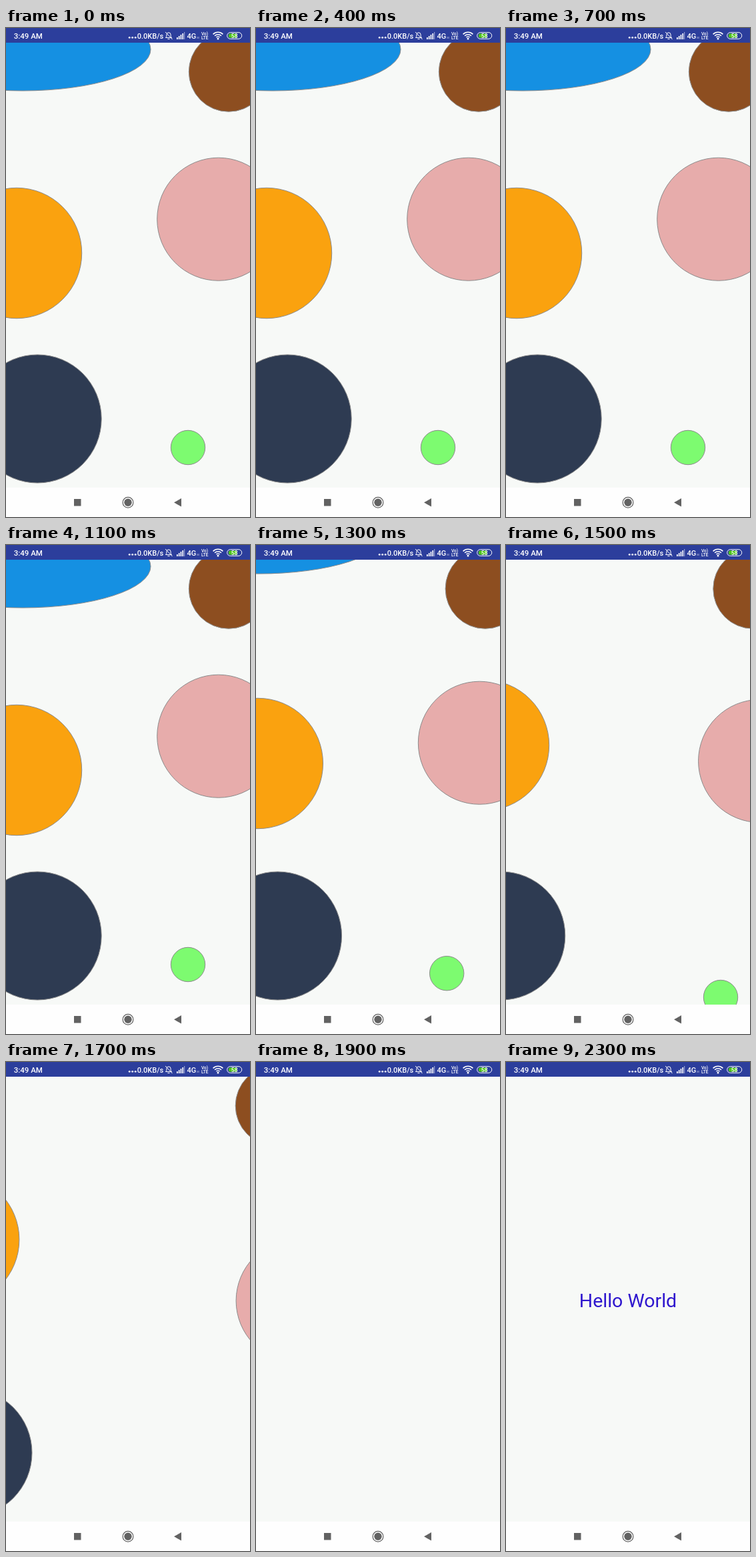
These frames come from a looping animation (366 by 732 pixels, 3.3 s). An HTML page:

```html
<!DOCTYPE html>
<html lang="en">
<head>
<meta charset="utf-8">
<title>Hello World</title>
<style>
html, body { margin: 0; width: 100%; height: 100%; overflow: hidden; background: #f7f9f7; }
svg { display: block; width: 366px; height: 732px; font-family: Roboto, sans-serif; }
#shapes { stroke: #8b8b8b; stroke-width: 1; }
.icon { fill: none; stroke: #fff; }
.bar { fill: #fff; font-weight: 500; }
</style>
</head>
<body>
<svg viewBox="0 0 366 732">
  <rect width="366" height="732" fill="#f7f9f7"/>
  <g id="shapes"></g>
  <text id="hello" x="183" y="366.5" font-size="28.5" text-anchor="middle" fill="#2f17ce">Hello World</text>

  <!-- status bar -->
  <rect width="366" height="22" fill="#2c3e9c"/>
  <g class="bar" font-size="11">
    <text x="11.7" y="15.5" font-size="11.5">3:49 AM</text>
    <circle cx="185.2" cy="14.3" r="1.4"/>
    <circle cx="189.7" cy="14.3" r="1.4"/>
    <circle cx="194.2" cy="14.3" r="1.4"/>
    <text x="196.7" y="15.5">0.0KB/s</text>
    <text x="271.5" y="15.5">4G</text>
    <text x="293" y="10.5" font-size="6.5">Vo)</text>
    <text x="293" y="17" font-size="6.5">LTE</text>
    <path d="M256 14h1.7v3h-1.7zM258.8 12h1.7v5h-1.7zM261.6 10h1.7v7h-1.7zM264.4 8h1.7v9h-1.7z"/>
    <path d="M267 6h1.2v11h-1.2zM286.5 13h1v3h-1zM288.5 13h1v3h-1z" opacity=".5"/>
    <circle cx="318" cy="16" r="1.5"/>
  </g>
  <g class="icon">
    <path d="M239.5 14.5h9l-1.4-2V10a3.1 3.1 0 0 0-6.2 0v2.5zM242.5 16.5h3M239 6l10.5 11"/>
    <path d="M310.6 9.4a10.5 10.5 0 0 1 14.8 0M313 11.8a7 7 0 0 1 10 0M315.4 14a3.7 3.7 0 0 1 5.2 0" stroke-width="1.5"/>
    <rect x="331.7" y="6.7" width="22" height="9.6" rx="4.8"/>
  </g>
  <path d="M337 8.3h9.5v6.4H337a3.2 3.2 0 0 1 0-6.4z" fill="#4fc51c"/>
  <text class="bar" x="342.7" y="14.6" font-size="8.5" text-anchor="middle">58</text>

  <!-- navigation bar -->
  <rect y="688" width="366" height="44" fill="#fefefe"/>
  <g fill="#626262">
    <rect x="102" y="705" width="10.5" height="10.5"/>
    <circle cx="183" cy="710.3" r="5.7"/>
    <circle cx="183" cy="710.3" r="7.9" fill="none" stroke="#626262" stroke-width="1.2"/>
    <path d="M252 710.3l11-6.3v12.6z"/>
  </g>
</svg>
<script>
// colour, centre x, centre y, radius x, radius y, travel x, travel y
const shapes = [
  ['#1590e2', 25, 32, 192, 62, -230, -560],
  ['#8d4e20', 334, 65.5, 59.7, 59.7, 108, 0],
  ['#e7acab', 318.7, 286.2, 92, 92, 183, 110],
  ['#faa20f', 16, 337, 97.7, 97.7, -145, -110],
  ['#2e3b52', 47.2, 585, 96, 96, -161, 0],
  ['#7dfb70', 273, 628, 25.7, 25.7, 145, 145]
];
const LOOP = 3300, STEP = 100, START = 1105, DURATION = 1000;
const group = document.getElementById('shapes');
const hello = document.getElementById('hello');
const clamp = v => Math.min(1, Math.max(0, v));

const nodes = shapes.map(([fill, cx, cy, rx, ry]) => {
  const node = document.createElementNS('http://www.w3.org/2000/svg', 'ellipse');
  Object.entries({ fill, cx, cy, rx, ry }).forEach(([k, v]) => node.setAttribute(k, v));
  return group.appendChild(node);
});

function draw(now) {
  const t = Math.floor(now % LOOP / STEP) * STEP;
  const p = (1 - Math.cos(Math.PI * clamp((t - START) / DURATION))) / 2;
  shapes.forEach(([, , , , , dx, dy], i) =>
    nodes[i].setAttribute('transform', `translate(${dx * p} ${dy * p})`));
  group.setAttribute('visibility', p < 1 ? 'visible' : 'hidden');
  hello.setAttribute('opacity', clamp((t - 2100) / 200));
}

function loop() {
  draw(performance.now());
  requestAnimationFrame(loop);
}
loop();
</script>
</body>
</html>
```
